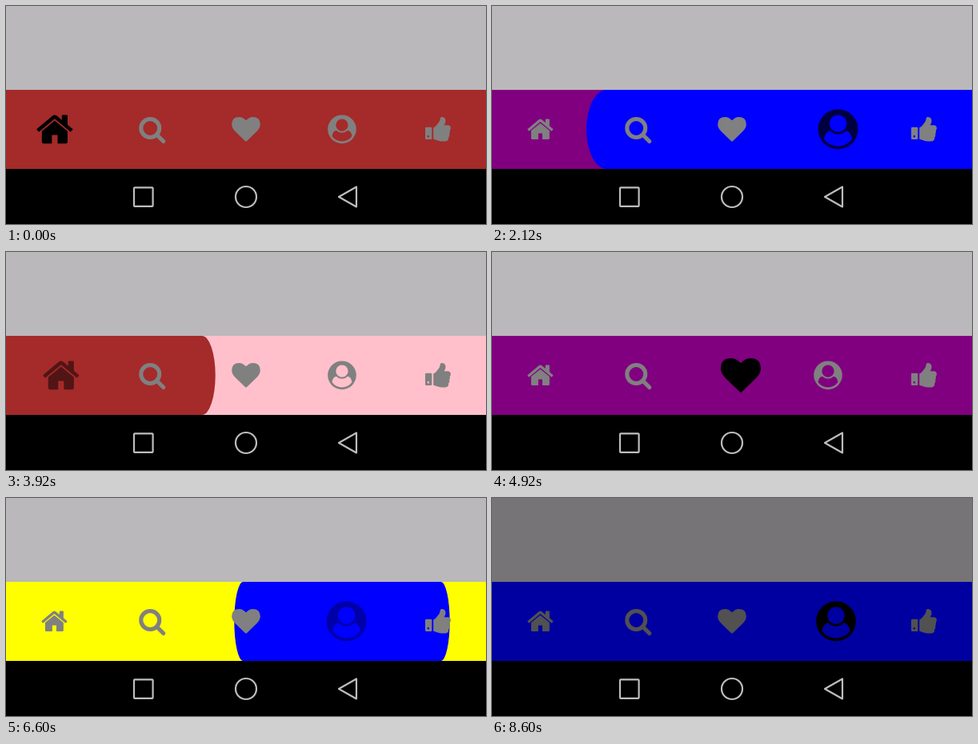
An HTML page with a canvas for the animation above (8720 ms loop, 600 by 273 pixels).

```html
<!DOCTYPE html>
<html>
<head>
<meta charset="utf-8">
<style>
html, body { margin: 0; width: 100%; height: 100%; overflow: hidden; background: #000; }
canvas { display: block; }
</style>
</head>
<body>
<canvas id="stage" width="600" height="273"></canvas>
<script>
const ctx = document.getElementById('stage').getContext('2d');
const LOOP = 8720;
const SPREAD = 600;
const BAR = { top: 105, height: 99 };
const ICON_Y = 154.3;
const UNIT = 0.0199; // icons are drawn on a 1792 unit grid

const shape = (...parts) => new Path2D(parts.join(''));
const circle = (x, y, r, sweep) =>
  `M${x - r} ${y}a${r} ${r} 0 1 ${sweep} ${2 * r} 0a${r} ${r} 0 1 ${sweep} ${-2 * r} 0Z`;

const home = shape(
  'M101 878L820 279Q896 227 972 279L1216 483V288Q1216 256 1248 256H1440Q1472 256 1472 288V696',
  'L1691 878Q1716 899 1695 923L1633 997Q1612 1018 1588 1001L896 424L204 1001Q180 1018 159 997',
  'L97 923Q76 899 101 878Z',
  'M896 512L1471 986V1472Q1471 1536 1408 1536H1024V1152H768V1536H384Q320 1536 320 1472V986Z');
const search = shape(
  circle(768, 832, 704, 0), circle(768, 832, 448, 1),
  'M1167 1412L1510 1754A128 128 0 0 0 1691 1573L1348 1231Z');
const heart = shape(
  'M896 1664Q870 1664 852 1646L228 1044Q0 820 0 596Q0 128 478 128Q680 128 896 344',
  'Q1112 128 1314 128Q1792 128 1792 596Q1792 817 1563 1046L940 1646Q922 1664 896 1664Z');
const user = shape(
  circle(896, 896, 896, 1), circle(896, 640, 384, 0),
  'M1523 1339Q1470 985 1251 963Q1100 1120 896 1120Q692 1120 541 963Q322 985 269 1339',
  'A768 768 0 0 0 1523 1339Z');
const thumb = shape(
  'M128 768H416Q480 768 480 832V1472Q480 1536 416 1536H128Q64 1536 64 1472V832Q64 768 128 768Z',
  circle(256, 1344, 64, 0),
  'M576 832Q576 770 637 768Q690 760 814 588Q880 500 915 468Q970 400 990 290Q1010 128 1088 128',
  'Q1344 128 1344 384Q1344 470 1280 592Q1256 630 1250 640H1472Q1664 640 1664 832',
  'Q1664 920 1609 981Q1640 1100 1581 1194Q1615 1320 1527 1405Q1550 1664 1281 1664H1152',
  'Q1000 1664 772 1580Q650 1536 614 1536Q576 1530 576 1472Z');

const tabs = [
  { icon: home, x: 60.4, color: '#a52a2a' },
  { icon: search, x: 182.8, color: '#ffff00' },
  { icon: heart, x: 300, color: '#800080' },
  { icon: user, x: 420, color: '#0000ff' },
  { icon: thumb, x: 540.6, color: '#ffc0cb' }
];
const HOME = 0, SEARCH = 1, HEART = 2, USER = 3, THUMB = 4;

const taps = [
  { at: -1000, tab: HOME },
  { at: 20, tab: SEARCH },
  { at: 857, tab: HEART },
  { at: 1820, tab: USER },
  { at: 2750, tab: THUMB },
  { at: 3675, tab: HOME },
  { at: 4473, tab: HEART },
  { at: 5440, tab: SEARCH },
  { at: 6400, tab: USER }
];

const clamp = v => Math.min(1, Math.max(0, v));
const easeInOut = t => t < 0.5 ? 2 * t * t : 1 - 2 * (1 - t) * (1 - t);

// The icon drifts right with the spread, then settles a little back.
const drift = s => s < 0.54 ? 25 * s : 13.5 - 3.5 * (s - 0.54) / 0.46;

function drawIcon(tab, color, shift = 0, scale = 1, alpha = 1) {
  ctx.save();
  ctx.globalAlpha = alpha;
  ctx.fillStyle = color;
  ctx.translate(tab.x + shift, ICON_Y);
  ctx.scale(UNIT * scale, UNIT * scale);
  ctx.translate(-896, -896);
  ctx.fill(tab.icon);
  ctx.restore();
}

function drawBar(previous, current, s) {
  ctx.save();
  ctx.beginPath();
  ctx.rect(0, BAR.top, 600, BAR.height);
  ctx.clip();
  ctx.fillStyle = tabs[previous].color;
  ctx.fillRect(0, BAR.top, 600, BAR.height);
  if (s > 0) {
    ctx.translate(60 + 120 * current, BAR.top);
    ctx.scale(s, 1);
    ctx.fillStyle = tabs[current].color;
    ctx.beginPath();
    ctx.roundRect(-SPREAD, 0, 2 * SPREAD, BAR.height, BAR.height / 2);
    ctx.fill();
  }
  ctx.restore();
}

function drawSystemButtons() {
  ctx.fillStyle = '#000';
  ctx.fillRect(0, 204, 600, 69);
  ctx.strokeStyle = '#bdbdbd';
  ctx.lineWidth = 2.2;
  ctx.lineJoin = 'round';
  ctx.beginPath();
  ctx.roundRect(160, 227.3, 23.6, 23.6, 1);
  ctx.moveTo(313, 239);
  ctx.arc(300, 239, 13, 0, 2 * Math.PI);
  ctx.moveTo(416, 239);
  ctx.lineTo(438, 226.5);
  ctx.lineTo(438, 251.5);
  ctx.closePath();
  ctx.stroke();
}

function draw(time) {
  let index = 0;
  while (index + 1 < taps.length && taps[index + 1].at <= time) index++;
  const { at, tab: current } = taps[index];
  const previous = index ? taps[index - 1].tab : current;
  const s = easeInOut(clamp((time - at) / 600));

  ctx.fillStyle = '#bab8ba';
  ctx.fillRect(0, 0, 600, BAR.top);
  drawBar(previous, current, s);
  tabs.forEach((tab, i) => {
    if (i === current) drawIcon(tab, '#000', index ? drift(s) : 0.5, 1.4, clamp(1.5 * s));
    else drawIcon(tab, '#808080');
  });

  ctx.fillStyle = `rgba(0, 0, 0, ${0.37 * clamp((time - 7640) / 240)})`;
  ctx.fillRect(0, 0, 600, 204);
  drawSystemButtons();
}

const start = performance.now();
function tick() {
  draw((performance.now() - start) % LOOP);
  requestAnimationFrame(tick);
}
tick();
</script>
</body>
</html>
```
